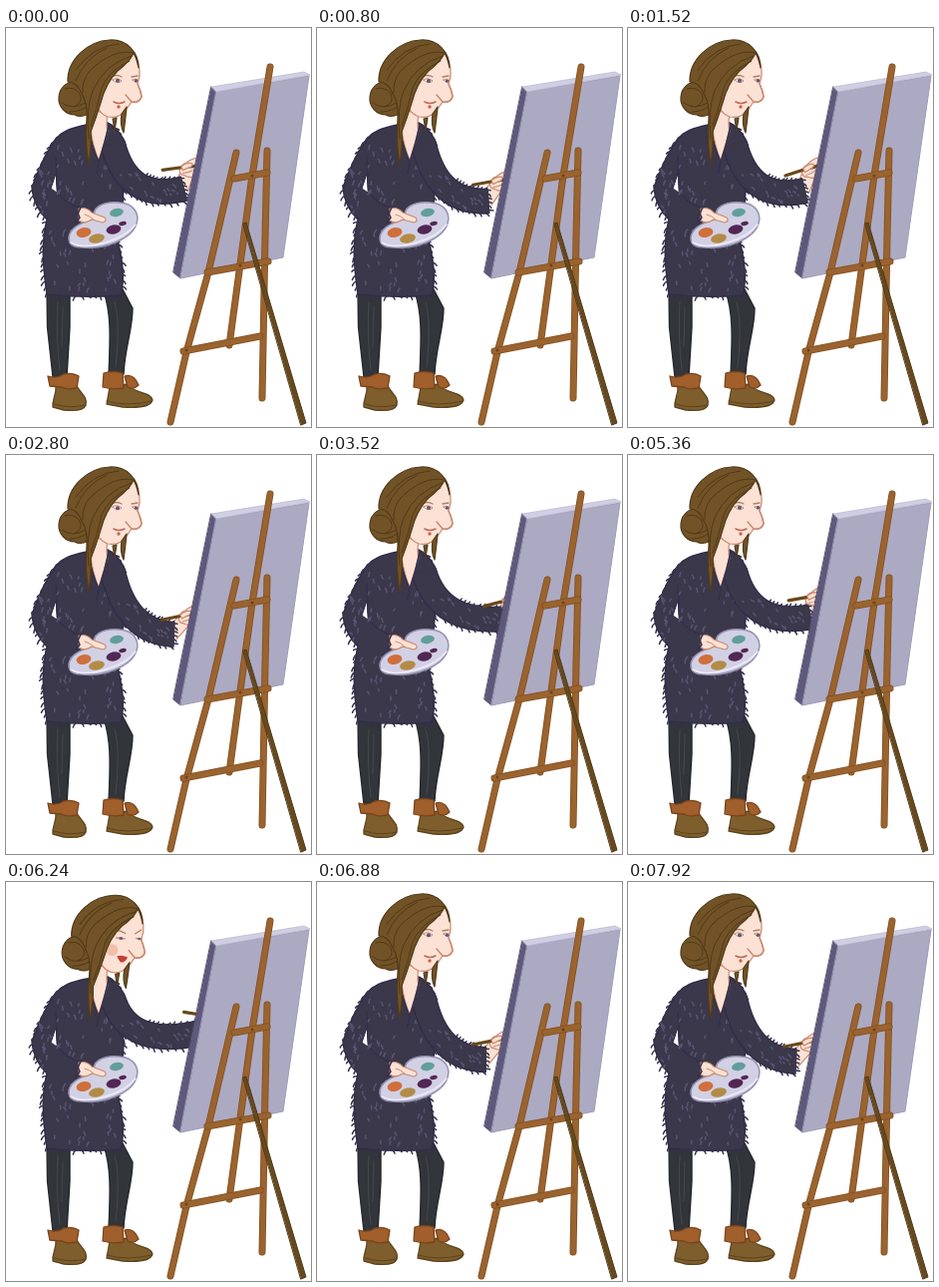
An HTML page for the animation above (8 s loop, 306x400 px).

```html
<!DOCTYPE html>
<html lang="en">
<head>
<meta charset="utf-8">
<title>Painter at the easel</title>
<style>
html, body { margin: 0; width: 100%; height: 100%; overflow: hidden; background: #fff; }
svg { display: block; width: 100vw; height: 100vh; }
path, line { stroke-linecap: round; stroke-linejoin: round; }
.coat { fill: #3c384b; stroke: #2f2c47; stroke-width: 1.5; }
.fur { fill: none; stroke: #585474; stroke-width: 1.5; }
.edge { fill: none; stroke: #34304b; stroke-width: 1.5; }
.skin { fill: #fbe2d5; stroke: #cb8a70; stroke-width: 1.2; }
.hair { fill: #725327; stroke: #513a18; stroke-width: 1.2; }
.lock { fill: none; stroke: #513a18; stroke-width: 1; }
.wood { fill: none; stroke: #80501f; stroke-width: 7; }
.grain { fill: none; stroke: #9a632f; stroke-width: 5.4; }
.leg { fill: #323539; stroke: #25282c; stroke-width: 1.4; }
.boot { fill: #7e5e2c; stroke: #5d431d; stroke-width: 1.3; }
.cuff { fill: #a05f2b; stroke: #79431c; stroke-width: 1.3; }
.flat { stroke-linecap: butt; fill: none; }
</style>
</head>
<body>
<svg viewBox="0 0 306 400">
  <g id="legs">
    <path class="leg" d="M41 262L41.500 300L47 350H61L64 300V264Z"/>
    <path class="leg" d="M98 264C105 285 105 305 103 347H118C119 322 127 302 127 281L116 260Z"/>
    <path d="M52 275Q50 310 54 343M109 275Q115 295 110 340M57 280L56 320" fill="none" stroke="#454a4c"/>
    <path class="boot" d="M50 358L71 359C75 366 82 370 80 378C78 384 68 384 58 383L47 380C46 372 51 368 50 358Z"/>
    <path class="cuff" d="M42 349Q51 352 58 347Q67 345 73 349L71 361Q60 363 56 360L44 359Z"/>
    <path class="boot" d="M104 360L122 357C128 367 145 364 147 373C145 380 130 381 117 380L101 377Z"/>
    <path class="cuff" d="M98 346Q108 343 117 346L118 361Q107 363 97 360Z"/>
    <path class="cuff" d="M119 349Q128 346 133 358Q128 363 122 360Z"/>
    <path d="M48 377Q62 382 80 378M101 374Q122 380 146 374" fill="none" stroke="#5d431d"/>
  </g>

  <path id="coat" class="coat" d="M81 97C66 100 56 103 48 114C39 127 32 143 26 160C27 174 33 184 41 192C36 213 36 232 41 267Q78 271 115 268C120 250 116 230 112 212C114 190 120 172 117 150L118 112Q112 100 102 95Z"/>
  <path d="M50 146L45 161L51 165Z" fill="#fff" stroke="#2f2c47"/>
  <path d="M50 130Q51 150 52 165Q60 176 75 181" class="edge"/>
  <path id="coatEdge" class="edge"/>
  <path id="coatFur" class="fur"/>

  <g id="arm">
    <path id="palmEdge" class="flat" stroke="#cb8a70" stroke-width="15"/>
    <path id="palm" class="flat" stroke="#fbe2d5" stroke-width="12.600"/>
    <path id="sleeveEdge" class="flat" stroke="#2f2c47" stroke-width="26"/>
    <path id="sleeve" class="flat" stroke="#3c384b" stroke-width="23.400"/>
    <path id="armEdge" class="edge"/>
    <path id="armFur" class="fur"/>
    <g id="hand">
      <path class="skin" d="M-10 1Q-8 -4 -3 -5Q3 -9 9 -9L13 0L6 9Q-1 11 -6 7Q-11 6 -10 1Z"/>
      <path d="M-27 0L-6 -1L22 -1" fill="none" stroke="#684818" stroke-width="3.200"/>
      <path class="skin" d="M-8 -2Q-2 -6 3 -4Q4 -1 -1 0L-7 2Z" stroke-width=".8"/>
      <path d="M-7 5Q-1 5 3 3" fill="none" stroke="#cb8a70"/>
    </g>
  </g>

  <path class="skin" d="M86 82L102 86Q100 97 102 103L93 133Q87 118 85 102Z"/>
  <path class="edge" d="M82 98Q86 119 93 134Q99 117 103 97M93 134L91 145"/>

  <g id="palette">
    <path d="M63 211C63 200 78 194 90 191C84 181 97 173 114 175C129 176 134 187 131 196C126 212 99 222 77 220C67 220 63 217 63 211Z" fill="#d2d0e4" stroke="#9592b2" stroke-width="1.500"/>
    <path d="M65 215Q76 222 100 215Q121 209 130 197" fill="none" stroke="#eeedf7" stroke-width="1.500"/>
    <g id="paints"></g>
    <path class="skin" d="M73 181Q81 179 86 185L99 190Q102 194 97 195L86 192Q79 197 73 193Z"/>
    <path d="M79 187Q84 188 88 192" fill="none" stroke="#cb8a70"/>
    <path class="edge" d="M75 180L72 186L74 190L70 195"/>
  </g>

  <g id="head">
    <path class="hair" d="M74 55C64 51 54 58 53 69C52 79 60 87 69 87C74 90 82 88 86 83Z"/>
    <path class="lock" d="M56 75Q66 83 80 75M59 61Q68 58 74 66Q78 75 68 79M64 84Q75 84 82 78"/>
    <path class="skin" d="M92 32L127 24Q135 34 134 48L132 56Q135 62 136 69Q134 75 126 74Q122 80 119 84Q112 91 102 89Q91 85 90 72Z"/>
    <path d="M132 56Q136 65 136 69Q133 76 126 74L120 67" fill="none" stroke="#cb8a70" stroke-width="1.500"/>
    <circle id="blush" cx="103" cy="67" r="6" fill="#eda98f"/>
    <g id="eyes">
      <path d="M107 52Q111 49 116 53Q112 57 107 52ZM127 52Q130 50 133 53Q130 56 127 52Z" fill="#f7f0ee" stroke="#a9796e" stroke-width=".8"/>
      <g id="pupils" fill="#665572"><circle cx="111.500" cy="53" r="2"/><circle cx="130" cy="53" r="1.700"/></g>
    </g>
    <path id="lids" d="M107 53Q111 56 116 54M127 53Q130 55 133 53" fill="none" stroke="#8d6254" stroke-width="1.300"/>
    <path id="brows" fill="none" stroke="#a98363" stroke-width="1.300"/>
    <path id="calmMouth" d="M108 74Q113 77 119 74" fill="none" stroke="#bd6b5b" stroke-width="1.500"/>
    <circle id="chin" cx="113" cy="79" r="1.700" fill="#d0604b"/>
    <path id="lips" d="M108 73Q113 71 119 74Q116 80 112 79Q110 77 108 73Z" fill="#c63f36"/>
    <path class="hair" d="M133 40C133 24 121 11 104 12C82 13 61 32 62 54C68 54 73 58 76 66Q82 75 81 91Q79 116 83 137Q86 118 85 104Q90 91 95 75Q100 55 112 43Q124 34 128 25Q131 30 133 40Z"/>
    <path class="hair" d="M121 79Q120 90 118 105Q114 97 116 86ZM111 90L109 103L107 91Z"/>
    <path class="lock" d="M128 25Q108 20 84 43Q76 52 77 65M126 28Q99 36 87 63Q80 80 83 111M113 16Q87 18 70 42M124 33Q103 43 96 60Q91 82 85 98M101 20Q79 30 70 53"/>
  </g>

  <g id="easel">
    <path d="M206 59L211 64L175 251L168 245Z" fill="#5e597b" stroke="#514c6c"/>
    <path d="M211 64L304 48L278 230L175 251Z" fill="#aca9c3" stroke="#9f9cb8"/>
    <path d="M206 59L299 44L305 47L211 64Z" fill="#d0cee2" stroke="#b9b6d0" stroke-width=".7"/>
    <g id="beams"></g>
    <path d="M238 196L241 195L301 396L296 398Z" fill="#67491f" stroke="#503916"/>
    <g fill="#6f421b"><circle cx="247" cy="148" r="1.500"/><circle cx="235" cy="238" r="1.500"/><circle cx="181" cy="323" r="1.500"/></g>
  </g>
</svg>
<script>
const $ = id => document.getElementById(id);
const set = (id, attrs) => { for (const k in attrs) $(id).setAttribute(k, attrs[k]); };
const LOOP = 8000, STEP = 80, TAU = Math.PI * 2;

function randomFrom(seed) {
  return () => (seed = (seed * 16807) % 2147483647) / 2147483647;
}
const f = n => n.toFixed(1);
const hair = (x, y, dx, dy) => `M${f(x)} ${f(y)}q${f(dx * .7)} ${f(dy * .2)} ${f(dx)} ${f(dy)}`;

$('paints').innerHTML = [
  [111, 185, 7, 4, '#609e9c'], [78, 205, 7.5, 4.8, '#cf6f3b'], [91, 211, 8, 4.5, '#b28b46'],
  [108, 202, 7.5, 4.5, '#522754'], [117, 196, 3.8, 2, '#522754']
].map(([x, y, rx, ry, c]) =>
  `<ellipse cx="${x}" cy="${y}" rx="${rx}" ry="${ry}" fill="${c}" transform="rotate(-12 ${x} ${y})"/>`).join('');

$('beams').innerHTML = [
  'M262 123L260 210L257 371', 'M265 39L247 148L224 318', 'M231 125L203 245L181 325L165 395',
  'M229 151L262 145', 'M202 245L263 234', 'M178 324L255 309'
].map(d => `<path class="wood" d="${d}"/><path class="grain" d="${d}"/>`).join('');

function growCoatFur() {
  const rnd = randomFrom(41), coat = $('coat'), length = coat.getTotalLength();
  let edge = '', fur = '';
  for (let s = 20; s < length - 22; s += 6) {
    const p = coat.getPointAtLength(s);
    const side = p.x < 75 ? -1 : 1;
    edge += hair(p.x, p.y, side * (1 + 3 * rnd()), 1 + 4 * rnd());
  }
  const areas = [[52, 112, 78, 175, 20], [33, 140, 44, 185, 14], [44, 198, 110, 262, 46], [96, 125, 112, 170, 8]];
  for (const [x0, y0, x1, y1, count] of areas)
    for (let i = 0; i < count; i++)
      fur += hair(x0 + (x1 - x0) * rnd(), y0 + (y1 - y0) * rnd(), 4 * rnd() - 2, 2 + 2 * rnd());
  set('coatEdge', { d: edge });
  set('coatFur', { d: fur });
}

// Pose: cuff x, y, elbow pull x, y, grip x, y, brush angle.
const POSE = {
  high:   [179, 161, 122, 176, 184, 140, -5],
  tilted: [178, 163, 122, 176, 184, 141, -15],
  mid:    [169, 180, 120, 178, 183, 161, -9],
  dip:    [168, 184, 120, 179, 182, 165, -6],
  low:    [168, 191, 122, 178, 181, 182, 2],
  bottom: [166, 197, 121, 181, 179, 188, 5],
  behind: [191, 164, 122, 171, 194, 146, -12],
  raised: [196, 148, 123, 168, 202, 125, 4],
  far:    [195, 151, 122, 168, 205, 136, 12]
};
const ARM = [
  [0, 'high'], [400, 'mid'], [640, 'mid'], [1040, 'high'], [1280, 'high'], [1520, 'tilted'],
  [1840, 'mid'], [2080, 'mid'], [2480, 'dip'], [2800, 'mid'], [3120, 'mid'], [3520, 'behind'],
  [3840, 'raised'], [4160, 'raised'], [4640, 'bottom'], [4800, 'low'], [5040, 'behind'],
  [5600, 'high'], [6240, 'far'], [6800, 'mid'], [7200, 'high'], [7680, 'mid'], [8000, 'mid']
];
const ease = k => (1 - Math.cos(Math.PI * k)) / 2;
const ramp = (t, a, b) => ease(Math.min(1, Math.max(0, (t - a) / (b - a))));

function poseAt(t) {
  const i = ARM.findIndex(key => key[0] > t);
  const [[t0, from], [t1, to]] = [ARM[i - 1], ARM[i]];
  const k = ramp(t, t0, t1);
  return POSE[from].map((v, n) => v + (POSE[to][n] - v) * k);
}

function drawArm([wx, wy, cx, cy, gx, gy, angle]) {
  const sx = 107, sy = 116, rnd = randomFrom(97);
  const curve = `M${sx} ${sy}Q${f(cx)} ${f(cy)} ${f(wx)} ${f(wy)}`;
  const palm = `M${f(wx - 3)} ${f(wy)}L${f(gx)} ${f(gy)}`;
  set('sleeve', { d: curve });
  set('sleeveEdge', { d: curve });
  set('palm', { d: palm });
  set('palmEdge', { d: palm });
  set('hand', { transform: `translate(${f(gx)} ${f(gy)}) rotate(${f(angle)})` });

  const at = (u, off) => {
    const v = 1 - u;
    const dx = v * (cx - sx) + u * (wx - cx), dy = v * (cy - sy) + u * (wy - cy), l = Math.hypot(dx, dy);
    return [v * v * sx + 2 * u * v * cx + u * u * wx - dy / l * off,
            v * v * sy + 2 * u * v * cy + u * u * wy + dx / l * off];
  };
  let edge = '', fur = '';
  for (let u = .3; u <= 1; u += .055) {
    edge += hair(...at(u, 12), 2 + 2 * rnd(), 2 + 3 * rnd());
    if (u > .5) edge += hair(...at(u, -12), 2 + 2 * rnd(), -1 - 2 * rnd());
  }
  for (let off = -11; off <= 12; off += 4) edge += hair(...at(1, off), 2 + 2 * rnd(), 3 * rnd());
  for (let i = 0; i < 20; i++) fur += hair(...at(.25 + .7 * rnd(), 18 * rnd() - 9), 3 * rnd(), 1 + 2 * rnd());
  set('armEdge', { d: edge });
  set('armFur', { d: fur });
}

function drawHead(t, gripY) {
  const turn = ramp(t, 5360, 5840) - ramp(t, 6320, 6720);
  const blink = t >= 2880 && t < 3040;
  set('head', { transform: `translate(${f(3.5 * turn)} ${f(turn)}) rotate(${f(1.5 * turn)} 95 60)` });
  set('blush', { opacity: f(turn * .6) });
  set('lips', { opacity: f(turn) });
  set('calmMouth', { opacity: f(1 - turn) });
  set('chin', { opacity: f(1 - turn) });
  set('eyes', { opacity: blink ? 0 : 1, transform: `translate(0 ${f(23.5 * turn)}) scale(1 ${f(1 - .45 * turn)})` });
  set('lids', { opacity: blink ? 1 : 0 });
  set('pupils', { transform: `translate(${f(.5 - turn * .3)} ${f((gripY - 150) / 45)})` });
  const lift = 2 * turn;
  set('brows', { d: `M105 ${f(49 - lift)}Q111 ${f(46 + lift / 2)} 116 ${f(49 + lift / 2)}M126 ${f(49 + lift / 2)}L132 ${f(48 - lift)}` });
}

function draw(t) {
  const pose = poseAt(t);
  drawArm(pose);
  drawHead(t, pose[5]);
}

growCoatFur();
const start = performance.now();
function tick() {
  const t = (performance.now() - start) % LOOP;
  draw(Math.floor(t / STEP) * STEP);
  requestAnimationFrame(tick);
}
tick();
</script>
</body>
</html>
```
